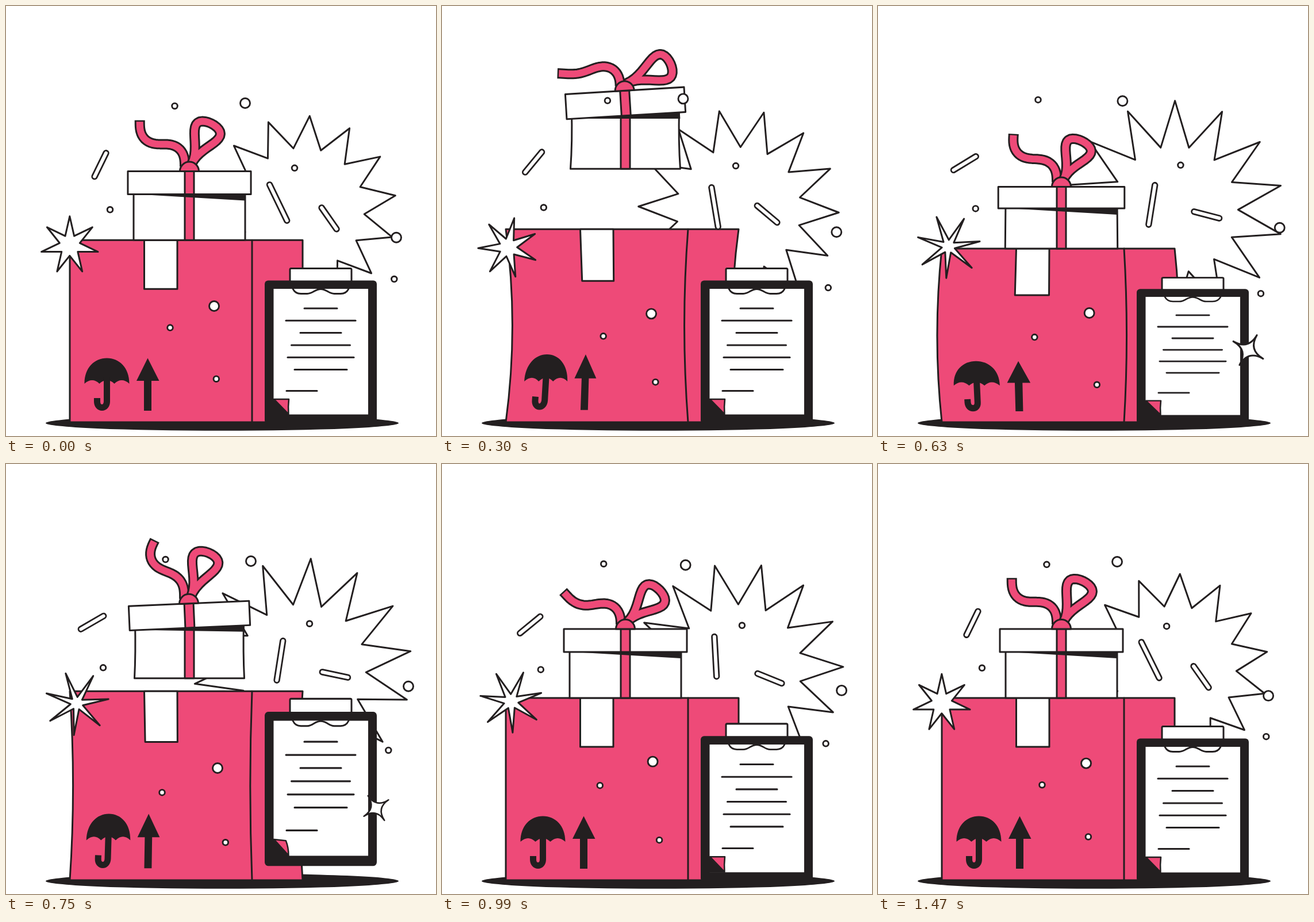
Write an HTML page with a canvas that moves like this. It is 748 px wide and 748 px high and loops after 1500 ms.

```html
<!DOCTYPE html>
<html lang="en">
<head>
<meta charset="utf-8">
<title>Parcels</title>
<style>
  html, body { margin: 0; width: 100%; height: 100%; overflow: hidden; background: #fff; }
  canvas { display: block; width: 100vw; height: 100vh; }
</style>
</head>
<body>
<canvas id="stage" width="748" height="748"></canvas>
<script>
const ctx = document.getElementById('stage').getContext('2d');
const LOOP = 1500, INK = '#231f20', PINK = '#ee4a78', WHITE = '#fff';
const { sin, cos, min, max, abs, sqrt, PI } = Math;
const rad = d => d * PI / 180;

// Gift timing in ms: a big jump, a landing, then a small hop
const JUMP = 240, LAND = 561, HOP = 674, REST = 808;

// Half sine wave between two times, zero outside; skew < 1 peaks early
const bump = (t, a, b, skew = 1) =>
  t <= a || t >= b ? 0 : sin(PI * ((t - a) / (b - a)) ** skew);
const flight = (t, a, b) => .0078 * (t - a) * (t - b);
const kick = t => bump(t, JUMP, LAND, .6);

// Box top offset: sinks under weight, springs up when released
const boxDrop = t => 22 * bump(t, 0, JUMP) - 20.5 * kick(t) + 16 * bump(t, LAND, HOP)
  - 12 * bump(t, HOP, REST) + 5 * bump(t, REST, 910);
const boxPinch = t => -.14 * boxDrop(t) * sqrt(abs(boxDrop(t)));
const giftDrop = t => min(boxDrop(t), flight(t, JUMP, LAND), flight(t, HOP, REST));
const lidTilt = t => -3.7 * bump(t, JUMP, 400) + 3 * bump(t, 400, 620) - 2.5 * bump(t, HOP, 820);
const ribbonDroop = t => 1.08 * kick(t) - .3 * bump(t, 620, 880) + .48 * bump(t, 880, 1100);
const boardLift = t => 34.5 * bump(t, 690, 895);
const boardStretch = t => 1 - .06 * bump(t, LAND, 690) + .075 * bump(t, 690, 810)
  - .045 * bump(t, 895, 965) + .018 * bump(t, 965, 1030);

function paint(fill, line = 3) {
  if (fill) { ctx.fillStyle = fill; ctx.fill(); }
  if (line) { ctx.strokeStyle = INK; ctx.lineWidth = line; ctx.stroke(); }
}

// Traces absolute M L Q C Z path data through a point map
function trace(d, map = (x, y) => [x, y]) {
  const call = { M: 'moveTo', L: 'lineTo', Q: 'quadraticCurveTo', C: 'bezierCurveTo', Z: 'closePath' };
  ctx.beginPath();
  for (const [, c, args] of d.matchAll(/([MLQCZ])([^MLQCZ]*)/g)) {
    const n = (args.match(/-?[\d.]+/g) || []).map(Number), p = [];
    for (let i = 0; i < n.length; i += 2) p.push(...map(n[i], n[i + 1]));
    ctx[call[c]](...p);
  }
}

function star(x, y, points, R, r, angle) {
  ctx.beginPath();
  for (let i = 0; i < points * 2; i++) {
    const a = angle + i * PI / points, q = i % 2 ? r : R;
    ctx.lineTo(x + q * cos(a), y + q * sin(a));
  }
  ctx.closePath();
  paint(WHITE);
}

function bigBox(t) {
  const drop = boxDrop(t), a = boxPinch(t), top = 407 + drop, mid = (724 + top) / 2;
  const pull = x => a * (x - 313.5) / 202.5;
  const side = x => x - 2 * pull(x);
  const warp = (x, y) => {
    const u = (724 - y) / 317;
    return [x - pull(x) * 4 * u * (1 - u), 724 - u * (317 - drop)];
  };
  ctx.beginPath();
  ctx.moveTo(111, 724);
  ctx.quadraticCurveTo(side(111), mid, 111, top);
  ctx.lineTo(516, top);
  ctx.quadraticCurveTo(side(516), mid, 516, 724);
  ctx.closePath();
  paint(PINK);
  ctx.beginPath();
  ctx.moveTo(428, 724);
  ctx.quadraticCurveTo(side(428), mid, 428, top);
  paint();
  trace('M240.5 407L298 407L298 492L240.5 492Z', warp);
  paint(WHITE);

  // Umbrella and arrow
  trace('M136.5 657C136.5 629 154 612.5 175.5 612.5C197 612.5 214.5 629 214.5 657Q201 645 188.5 657Q175.5 645 162.5 657Q150 645 136.5 657Z', warp);
  paint(INK, 0);
  ctx.lineCap = 'butt';
  trace('M175.5 645L175.5 688C175.5 702 158.5 702 158.5 688L158.5 682', warp);
  paint(null, 11);
  ctx.lineCap = 'round';
  trace('M246.5 612.5L266.5 652L253 652L253 704L240 704L240 652L227 652Z', warp);
  paint(INK, 0);
}

// Strokes a line of points as a pink band with a dark outline
function band(points) {
  ctx.lineCap = 'butt';
  const [[ax, ay], [bx, by]] = points.slice(-2), len = Math.hypot(bx - ax, by - ay);
  for (const [color, width, extra] of [[INK, 18, 2.5], [PINK, 12, 0]]) {
    ctx.beginPath();
    for (const p of points) ctx.lineTo(...p);
    ctx.lineTo(bx + (bx - ax) / len * extra, by + (by - ay) / len * extra);
    ctx.strokeStyle = color;
    ctx.lineWidth = width;
    ctx.stroke();
  }
  ctx.lineCap = 'round';
}

// Tail: heads up, sweeps left, turns up again; droop swings the tip down
function ribbonTail(droop) {
  const steps = 32, step = 130 / steps, points = [[-8, -8]];
  for (let i = 0; i < steps; i++) {
    const u = (i + .5) / steps, [x, y] = points[i];
    const a = rad(90 * (1 - .3 * abs(droop)) * sin(PI * u) ** 2 + 90 * droop * u);
    points.push([x - step * sin(a), y - step * cos(a)]);
  }
  band(points);
}

// Loop: a teardrop on an axis that leans over as it droops
function ribbonLoop(droop, stretch) {
  const lean = rad(26 + 40 * max(droop, droop / 3)), h = 78 * (.5 + .5 * stretch), points = [];
  for (let u = 0; u <= 1; u += 1 / 32) {
    const along = h * sin(PI * u), out = 30 * sin(2 * PI * u) * sin(PI * u);
    points.push([4 + along * sin(lean) - out * cos(lean), -13 - along * cos(lean) - out * sin(lean)]);
  }
  band(points);
}

function gift(t) {
  const drop = giftDrop(t), s = 1 - .007 * boxDrop(t), deg = lidTilt(t), tilt = rad(deg);
  const lidH = 40 * (1 + .65 * (s - 1)), bodyH = 80 * (1 + 1.2 * (s - 1)), mid = lidH / 2;
  const half = 107 * (1.25 - .25 * s), up = 97 + deg;
  const low = 97 - 1.5 * min(1, -drop / 30), bend = (up + low) / 2 + deg * .7;

  ctx.save();
  ctx.translate(319, 407 + drop - bodyH);
  ctx.beginPath();
  ctx.moveTo(-up, -12);
  ctx.quadraticCurveTo(-bend, bodyH / 2, -low, bodyH);
  ctx.lineTo(low, bodyH);
  ctx.quadraticCurveTo(bend, bodyH / 2, up, -12);
  paint(WHITE);
  ctx.beginPath();
  ctx.rect(-8, -6, 16, bodyH + 6);
  paint(PINK);

  ctx.translate(0, -mid);
  ctx.save();
  ctx.rotate(tilt);
  ctx.beginPath();
  ctx.moveTo(-91, mid);
  ctx.lineTo(up, mid);
  ctx.lineTo(up, mid + 11);
  ctx.closePath();
  paint(INK, 0);
  for (const [w, fill] of [[half, WHITE], [8, PINK]]) {
    ctx.beginPath();
    ctx.rect(-w, -mid, w * 2, lidH);
    paint(fill);
  }
  ctx.restore();

  ctx.translate(mid * sin(tilt), -mid * cos(tilt));
  ribbonTail(ribbonDroop(t));
  ribbonLoop(ribbonDroop(t), s);
  ctx.rotate(tilt);
  ctx.beginPath();
  ctx.arc(0, 0, 16.5, PI, 2 * PI);
  ctx.closePath();
  paint(PINK);
  ctx.restore();
}

function clipboard(t) {
  const lift = boardLift(t), curl = lift / 27;
  ctx.save();
  ctx.translate(0, 727 - lift);
  ctx.scale(1, boardStretch(t));
  ctx.translate(0, -727);
  ctx.beginPath();
  ctx.roundRect(494, 456.5, 107, 26, 2);
  paint(WHITE);
  ctx.beginPath();
  ctx.roundRect(450, 477.5, 195, 249.5, 6);
  paint(INK, 0);
  ctx.fillStyle = WHITE;
  ctx.fillRect(465.5, 492, 164.5, 218.5);
  trace('M499 492C502 498 507 500.5 513 500.5L524 500.5C534 500.5 537 492.5 547.5 492.5C558 492.5 561 500.5 571 500.5L582 500.5C588 500.5 593 498 596 492');
  paint(WHITE, 2.8);
  [57, 121, 71, 102, 115, 91].forEach((w, i) => {
    const y = 526 + 21.3 * i;
    trace(`M${547.5 - w / 2} ${y}L${547.5 + w / 2} ${y}`);
    paint();
  });
  trace('M488 669.5L541 669.5');
  paint();
  trace('M465 684L465 711L492 711Z');
  paint(INK, 0);
  trace(`M466 684L${492 - 5 * curl} ${684 + 2 * curl}Q${490.5 + curl} 697 491.5 710Z`);
  paint(PINK, 2.5);
  ctx.restore();
}

function sparkle(t) {
  const r = 31 * bump(t, 480, 900, .85);
  if (!r) return;
  ctx.save();
  ctx.translate(644, 598.5);
  ctx.rotate(rad(4 + (t - 510) * .217));
  ctx.beginPath();
  ctx.moveTo(r, 0);
  for (let i = 1; i <= 4; i++) ctx.quadraticCurveTo(0, 0, r * cos(i * PI / 2), r * sin(i * PI / 2));
  ctx.closePath();
  paint(WHITE, min(3, r * .1));
  ctx.restore();
}

// Everything floating drifts on an ellipse once per loop
const drift = (w, x, dx, y, dy, phase) => [x + dx * cos(w), y + dy * cos(w + rad(phase))];

function dot(r, ...orbit) {
  ctx.beginPath();
  ctx.arc(...drift(...orbit), r, 0, 2 * PI);
  paint(WHITE, 2.9);
}

function stick(len, angle, ...orbit) {
  ctx.save();
  ctx.translate(...drift(...orbit));
  ctx.rotate(rad(angle));
  ctx.beginPath();
  ctx.roundRect(-len / 2 - 4.3, -4.3, len + 8.6, 8.6, 4.3);
  paint(WHITE, 2.8);
  ctx.restore();
}

function confetti(w) {
  const big = 8.5, small = 4.8;
  dot(big, w, 421, -5, 169, 8, 90);
  dot(big, w, 689.5, -10.5, 394.7, 9, 27);
  dot(big, w, 365, -3, 525.5, 12, -107);
  dot(small, w, 285.5, 8, 170, 8, 60);
  dot(small, w, 175, 6, 354.3, 4, 90);
  dot(small, w, 670.3, 5, 486.5, -13.7, 33);
  dot(small, w, 278.5, 7, 565.5, 12.7, -118);
  dot(small, w, 373.8, -8, 653.5, -5.3, 25);
  dot(small, w, 515, -13, 279.8, 3.2, 50);
  stick(45.5, -47 - 17 * cos(w + .1), w, 157, 7, 276, 4.7, 87);
  stick(69.3, 81.5 - 18 * cos(w + .26), w, 475, -1.4, 342, 8.3, -90);
  stick(45.3, 33.5 + 21.5 * cos(w), w, 567.2, -5.2, 368, 7, 78);
}

function draw(now) {
  const t = now % LOOP, w = 2 * PI * t / LOOP;
  ctx.fillStyle = WHITE;
  ctx.fillRect(0, 0, 748, 748);
  ctx.lineJoin = ctx.lineCap = 'round';
  star(516, 354, 14, 176.5 - 13.5 * cos(w + .15), 109 - 1.5 * cos(w), rad(-8.6 + 360 / 7 * t / LOOP));
  ctx.beginPath();
  ctx.ellipse(376, 725.5, 307, 13.3, 0, 0, 2 * PI);
  paint(INK, 0);
  bigBox(t);
  gift(t);
  clipboard(t);
  sparkle(t);
  star(117 - 6.2 * cos(w), 416.3 + 4 * sin(w), 7, 53 - 2.5 * cos(w), 14.5 + 3.5 * cos(w),
    rad(-74.5 - 15.5 * cos(w + .06)));
  confetti(w);
}

const start = performance.now();
function tick() {
  draw(performance.now() - start);
  requestAnimationFrame(tick);
}
tick();
</script>
</body>
</html>
```
